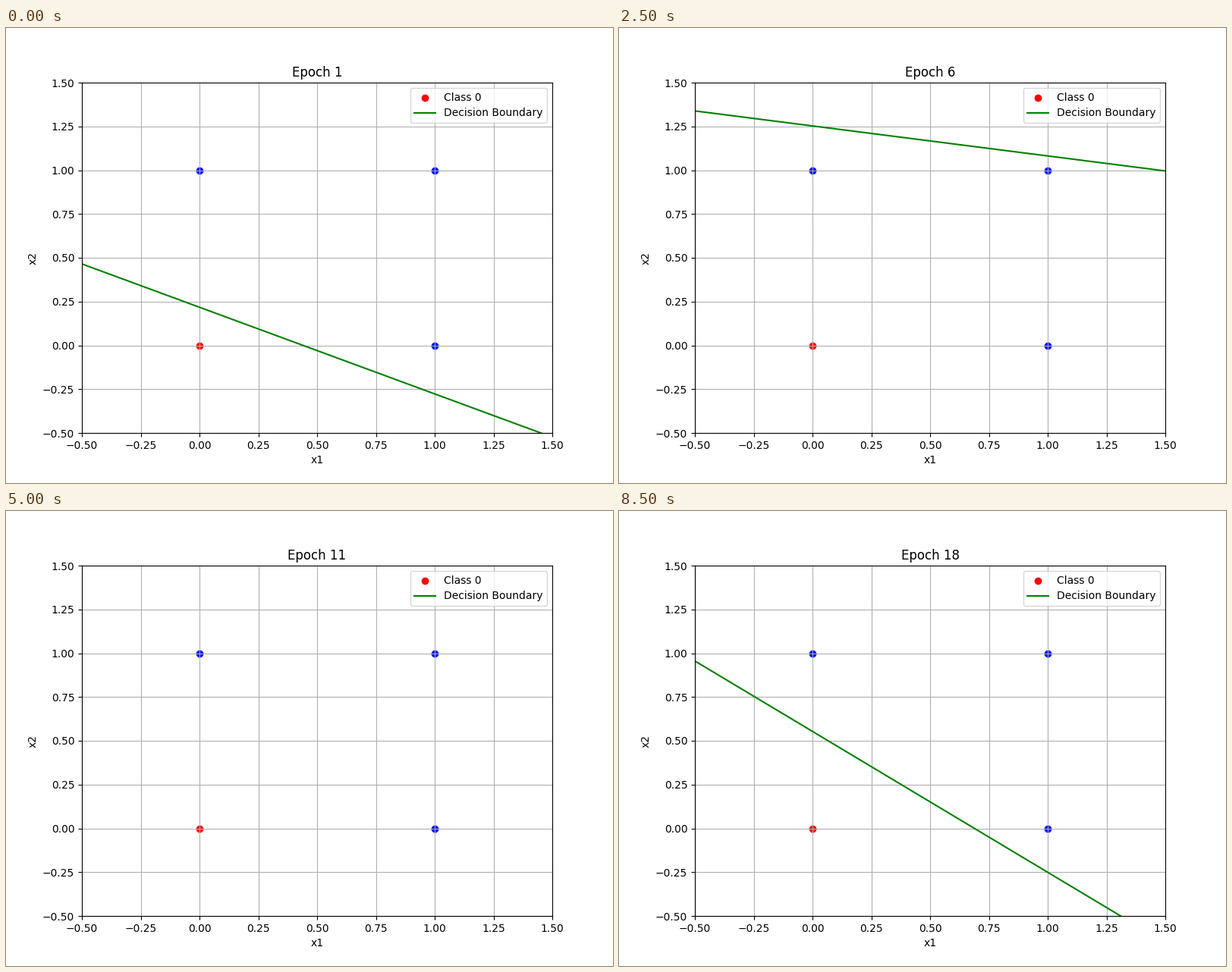
Animation, 800 px wide and 600 px high, one loop 9000 ms. Source, as a matplotlib script:

```python
import numpy as np
import matplotlib.pyplot as plt
from matplotlib.animation import FuncAnimation

EPOCHS = 18
POINTS = np.array([[0, 0], [0, 1], [1, 0], [1, 1]])
LABELS = [0, 1, 1, 1]


def train():
    """Run a perceptron on the OR gate; return (w1, w2, bias) after each epoch.

    Weights are measured in units of the learning rate.
    """
    w = np.array([-6.547, -11.1932])
    b = 0
    history = []
    for _ in range(EPOCHS):
        for point, label in zip(POINTS, LABELS):
            error = label - int(w @ point + b >= 0)
            w = w + error * point
            b += error
        history.append((*w, b))
    return history


HISTORY = train()
fig, ax = plt.subplots(figsize=(8, 6), dpi=100)


def draw(epoch):
    w1, w2, b = HISTORY[epoch]
    ax.clear()
    for (x, y), label in zip(POINTS, LABELS):
        ax.scatter(x, y, color="blue" if label else "red",
                   label=None if label else "Class 0")
    x = np.linspace(-0.5, 1.5, 100)
    ax.plot(x, -(w1 * x + b) / w2, color="green", label="Decision Boundary")
    ax.set(xlim=(-0.5, 1.5), ylim=(-0.5, 1.5), xlabel="x1", ylabel="x2",
           title=f"Epoch {epoch + 1}")
    ax.grid(True)
    # The legend steps aside whenever the boundary crosses its corner.
    ax.legend(loc="best")
    return []


anim = FuncAnimation(fig, draw, frames=EPOCHS, init_func=lambda: draw(0),
                     interval=500, repeat=True, repeat_delay=0)
plt.show()
```
